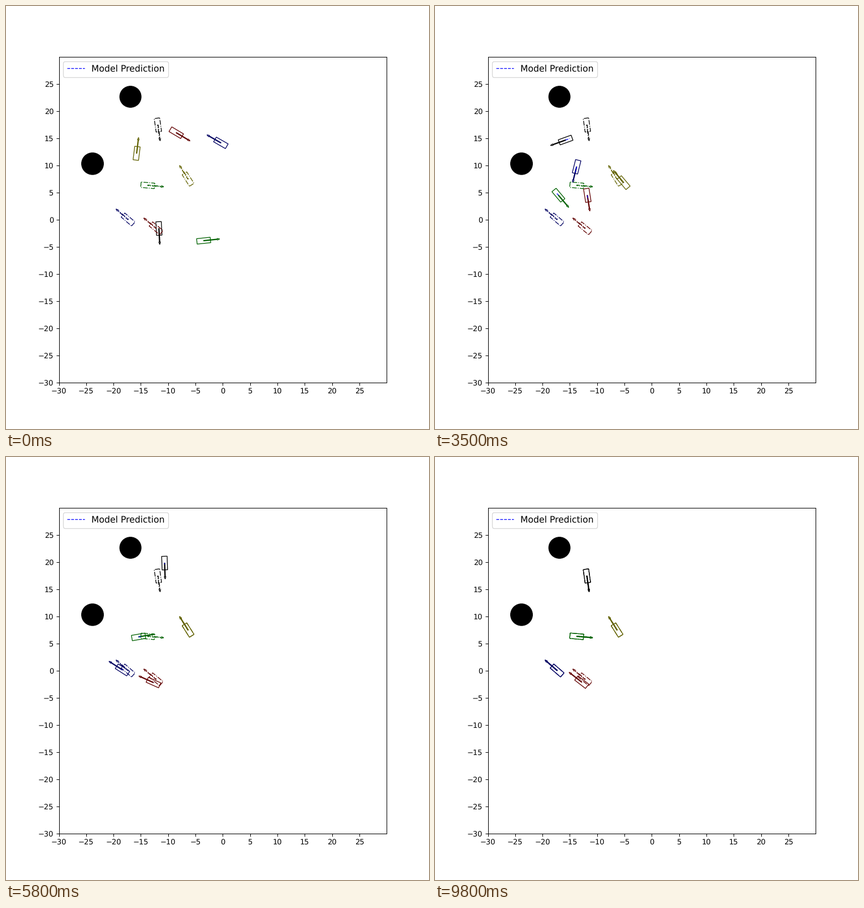
Recreate the animation shown at these times as a matplotlib script. Size 748 px wide and 748 px high, loop 9900 ms.

```python
import numpy as np
import matplotlib.pyplot as plt
from matplotlib.animation import FuncAnimation
from matplotlib.patches import Circle, FancyArrow, Rectangle

FRAMES = 99
SIZE = 748
LENGTH, WIDTH = 2.5, 1.0
HORIZON = 1.3  # frames covered by the prediction line
DARK = 0.38


def unit(deg):
    return np.array([np.cos(np.radians(deg)), np.sin(np.radians(deg))])


def hermite(u, a, b, ma, mb):
    """Value and slope of the cubic from a to b with end slopes ma, mb."""
    value = ((1 + 2 * u) * (1 - u) ** 2 * a + u * u * (3 - 2 * u) * b
             + u * (1 - u) ** 2 * ma + u * u * (u - 1) * mb)
    slope = (6 * u * (1 - u) * (b - a)
             + (1 - u) * (1 - 3 * u) * ma + u * (3 * u - 2) * mb)
    return value, slope


class Drive:
    """Moves through (frame, x, y, heading) stops, pointing along its path.

    The gear of each leg follows from the headings; the car halts at both
    ends of the drive and wherever the gear changes.
    """

    def __init__(self, stops):
        self.t, x, y, heading = np.array(stops, float).T
        self.pos = np.column_stack((x, y))
        self.dir = unit(heading).T
        legs = np.diff(self.pos, axis=0)
        self.dist = np.hypot(*legs.T)
        self.gear = np.sign(np.sum(legs * (self.dir[:-1] + self.dir[1:]), axis=1))
        pace = self.dist / np.diff(self.t)
        a, b = pace[:-1], pace[1:]
        rolling = self.gear[:-1] == self.gear[1:]
        self.speed = np.pad(rolling * 2 * a * b / (a + b), 1)

    def pose(self, time):
        time = min(time, self.t[-1])
        i = min(np.searchsorted(self.t, time, side="right"), len(self.t) - 1) - 1
        span, dist, gear = self.t[i + 1] - self.t[i], self.dist[i], self.gear[i]
        s0, s1 = self.speed[i:i + 2] * span / dist
        u, _ = hermite((time - self.t[i]) / span, 0, 1, s0, s1)
        m0, m1 = gear * dist * self.dir[i:i + 2]
        pos, tangent = hermite(u, self.pos[i], self.pos[i + 1], m0, m1)
        dx, dy = gear * tangent
        return pos, np.degrees(np.arctan2(dy, dx))


class Car:
    def __init__(self, ax, color, style="-"):
        look = dict(fc="none", ec=color, lw=1, ls=style)
        self.box = ax.add_patch(Rectangle((0, 0), WIDTH, LENGTH,
                                          rotation_point="center", **look))
        self.arrow = ax.add_patch(FancyArrow(0, 0, LENGTH, 0, width=0.1, **look))

    def place(self, pos, heading):
        self.box.set_xy(pos - np.array([WIDTH, LENGTH]) / 2)
        self.box.set_angle(heading - 90)
        dx, dy = LENGTH * unit(heading)
        self.arrow.set_data(x=pos[0], y=pos[1], dx=dx, dy=dy)


plt.rcParams["text.hinting"] = "none"
fig, ax = plt.subplots(figsize=(8, 8), dpi=SIZE / 8)
ticks = np.arange(-30, 30, 5)
ax.set(xlim=(-30, 30), ylim=(-30, 30), xticks=ticks, yticks=ticks)
for x, y, r in ((-16.9, 22.63, 1.95), (-23.84, 10.3, 2.0)):
    ax.add_patch(Circle((x, y), r, color="black"))

cars = []


def add_car(color, goal, *stops):
    Car(ax, color, "-.").place(np.array(goal[:2]), goal[2])
    trail, = ax.plot([], [], "b--", lw=1)
    cars.append((Drive(stops), Car(ax, color), trail))


goal = (-11.88, 17.44, -82)
add_car((0, 0, 0), goal,
        (0, -11.69, -1.63, -87), (14, -11.84, 1.84, -88), (27, -17, 8.3, -45),
        (35, -15.77, 14.66, 200), (50, -10.8, 19.13, -77),
        (57, -10.65, 19.87, -85), (66, -11.47, 18.09, -119), (77, *goal))

add_car((DARK, 0, 0), (-12.2, -1.6, 140),
        (0, -8.52, 16.01, -31), (14, -7.66, 12.99, -114),
        (27, -12.92, 9.55, -112), (35, -11.8, 4.48, -81),
        (50, -12.48, -2.26, 171), (72, -12.82, -2.12, 142))

goal = (-13.74, 6.32, -5)
add_car((0, DARK, 0), goal,
        (0, -3.5, -3.88, 6), (14, -6.48, -2.29, -44), (27, -12.92, 3.3, -38),
        (35, -17.09, 4.5, -50), (45, -18.87, 5.7, -3), (66, *goal))

goal = (-17.32, 0.02, 139)
add_car((0, 0, DARK), goal,
        (0, -0.35, 14.14, 150), (14, -3.3, 14.97, 163), (27, -10.6, 14.39, 200),
        (35, -13.76, 9.73, 256), (50, -17.04, -0.38, 185),
        (66, -18.87, 0.43, 153), (80, *goal))

goal = (-6.35, 7.47, 122)
add_car((DARK, DARK, 0), goal,
        (0, -15.77, 12.21, 83), (14, -14.13, 9.34, 149), (27, -7.28, 7.2, 200),
        (35, -5.15, 6.81, 130), (50, *goal))

ax.legend([cars[0][2]], ["Model Prediction"], loc="upper left", fontsize=12)


def update(frame):
    for drive, car, trail in cars:
        car.place(*drive.pose(frame))
        ahead = np.linspace(0, min(frame, HORIZON), 5)
        points = np.array([drive.pose(frame + a)[0] for a in ahead])
        trail.set_data(*points.T)
    return []


anim = FuncAnimation(fig, update, frames=FRAMES, interval=100,
                     repeat=True, repeat_delay=0)
plt.show()
```
